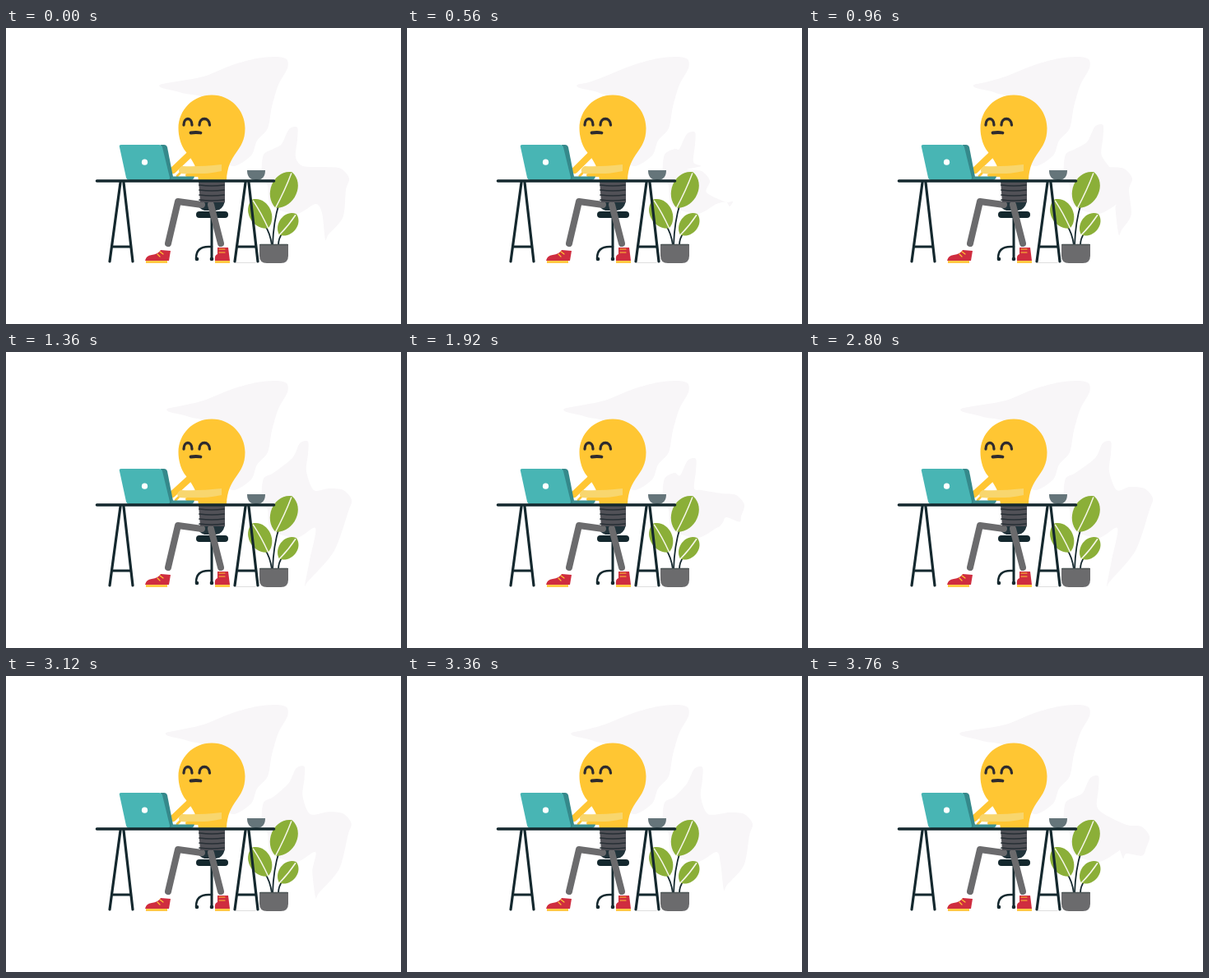
Recreate the animation shown at these times as an HTML page with a canvas. Size 480 by 360 pixels, loop 3.84 s.

```html
<!DOCTYPE html>
<html lang="en">
<head>
<meta charset="utf-8">
<title>Bulb at work</title>
<style>
html, body { margin: 0; width: 100%; height: 100%; overflow: hidden; background: #fff; }
canvas { display: block; width: 480px; height: 360px; }
</style>
</head>
<body>
<canvas id="stage" width="480" height="360"></canvas>
<script>
const ctx = document.getElementById('stage').getContext('2d');
const LOOP = 3840, STEP = 80;
const INK = '#14282e', YELLOW = '#ffc633', GREY = '#6b6b6d', TEAL = '#48b5b4';
const GREEN = '#8baf38', RED = '#cf2d3f', HAZE = '#f8f6f8';

// time, tip x, peak x/y, right edge x/y, tail x/y
const drift = [
  [0, 187, 350, 121, 417, 183, 388, 257],
  [560, 207, 346, 127, 368, 186, 392, 217],
  [1360, 196, 363, 109, 420, 180, 363, 285],
  [1920, 191, 347, 130, 410, 186, 384, 207],
  [2800, 186, 364, 109, 419, 178, 363, 285],
  [3360, 200, 355, 111, 420, 180, 385, 260],
  [3760, 185, 349, 122, 415, 195, 383, 222],
  [LOOP, 187, 350, 121, 417, 183, 388, 257]
];

function driftAt(t) {
  const i = drift.findIndex(k => k[0] > t);
  const a = drift[i - 1], b = drift[i];
  const u = (t - a[0]) / (b[0] - a[0]), e = u * u * (3 - 2 * u);
  return a.map((v, j) => v + (b[j] - v) * e);
}

function fill(path, color) {
  ctx.fillStyle = color;
  ctx.fill(new Path2D(path));
}

function stroke(path, width, color = INK, cap = 'round') {
  ctx.strokeStyle = color;
  ctx.lineWidth = width;
  ctx.lineCap = cap;
  ctx.lineJoin = 'round';
  ctx.stroke(new Path2D(path));
}

function disc(x, y, r, color) {
  ctx.fillStyle = color;
  ctx.beginPath();
  ctx.arc(x, y, r, 0, Math.PI * 2);
  ctx.fill();
}

// Closed smooth curve through every point.
function blob(points, color) {
  const n = points.length, at = i => points[(i + n) % n];
  ctx.beginPath();
  ctx.moveTo(...points[0]);
  for (let i = 0; i < n; i++) {
    const [p, a, b, q] = [at(i - 1), at(i), at(i + 1), at(i + 2)];
    ctx.bezierCurveTo(
      a[0] + (b[0] - p[0]) / 7, a[1] + (b[1] - p[1]) / 7,
      b[0] - (q[0] - a[0]) / 7, b[1] - (q[1] - a[1]) / 7, b[0], b[1]);
  }
  ctx.fillStyle = color;
  ctx.fill();
}

function drawHaze(t) {
  const [, tip, px, py, rx, ry, tx, ty] = driftAt(t);
  blob([
    [tip, 69], [tip + 14, 66], [240, 59], [275, 45], [305, 37], [328, 35],
    [341, 38], [342, 49], [331, 69], [323, 96], [318, 122], [305, 137],
    [297, 156], [270, 165], [250, 92], [tip + 27, 79], [tip + 3, 73]
  ], HAZE);
  blob([
    [311, 176], [313, 154], [325, 147], [px - 15, py + 20], [px - 6, py + 2],
    [px + 4, py], [px + 4, py + 15], [px + 2, py + 36], [px + 11, 168],
    [rx - 28, ry - 14], [rx - 10, ry - 12], [rx, ry], [rx - 4, ry + 14],
    [(rx + tx) / 2 + 7, (ry + ty) / 2 + 10], [tx + 4, ty - 6], [tx, ty],
    [Math.max(tx - 4, 369), Math.max(212, ty - 32)], [376, 214], [353, 226],
    [322, 216], [318, 192]
  ], HAZE);
}

function drawLeaf(x, y, length, width, angle) {
  ctx.save();
  ctx.translate(x, y);
  ctx.rotate(angle);
  const h = length / 2, w = width * 0.66;
  fill(`M0 ${-h}C${w} ${-h * .75} ${w} ${h * .65} 0 ${h}C${-w} ${h * .65} ${-w} ${-h * .75} 0 ${-h}`, GREEN);
  stroke(`M0 ${-h + 2}Q1.5 0 0 ${h}`, 1.5, '#f5f6e8');
  ctx.restore();
}

function drawPlant() {
  stroke('M324 264Q325 235 332 213', 1.8);
  stroke('M323 264Q321 249 314 239', 1.8);
  stroke('M331 264Q331 256 336 249', 1.8);
  drawLeaf(309, 226, 40, 27, -0.5);
  drawLeaf(342.5, 239, 33, 22, 0.68);
  drawLeaf(337.5, 197, 48, 32, 0.43);
  fill('M308 263H343V277Q343 286 334 286H317Q308 286 308 277Z', GREY);
  stroke('M309 263.5H342', 1.5, '#4c5555');
}

function drawTrestle(x) {
  stroke(`M${x - 2} 188L${x - 15} 284M${x + 2} 188L${x + 13} 284`, 3.2);
  stroke(`M${x - 11} 266H${x + 10}`, 2.8);
}

function drawChair() {
  stroke('M250 229V281', 3);
  stroke('M231 280Q231 266 246 266H250', 2.5);
  disc(232, 281, 2.3, INK);
  disc(250, 281, 2.3, INK);
  stroke('M235 227H266', 8);
}

function drawLegs() {
  fill('M234 211H266Q263 222 255 222H241Q235 220 232 214Z', '#22343b');
  stroke('M238 215L209 211L197 262', 8, GREY);
  stroke('M249 215L261 262', 8, GREY);

  fill('M169 283Q170 277 177 276Q185 275 188 270L200 271L198 283Z', RED);
  stroke('M170 284.5H196', 2.7, YELLOW, 'butt');
  stroke('M184 275L187 278M187 272L191 275', 1.2, YELLOW);
  fill('M257 267H270L272 283H254Q253 276 257 275Z', RED);
  stroke('M254 284.5H272', 2.7, YELLOW, 'butt');
  stroke('M259 269H266M259 273H266', 1.2, YELLOW);
}

function drawBulb(t) {
  const tap = Math.sin(t / 480 * Math.PI * 2);
  stroke(`M224 153L${203 + tap} 173`, 8, YELLOW);
  fill('M250 81.5C273 81.5 290.5 100 290.5 122C290.5 151 269 151 268 186H234C232 164 222 156 216 147C212 140 209.5 131 209.5 122C209.5 100 227 81.5 250 81.5Z', YELLOW);

  stroke('M216 118C216 108 226 108 226 118', 3.3, '#2e2b2e');
  stroke('M235 118C235 108 247 108 247.5 118', 3.3, '#2e2b2e');
  stroke('M224.5 127.5Q231 126.5 236.5 127.5', 3.8, '#2e2b2e');

  const hand = 211 + 2 * tap;
  fill(`M${hand + 3} 168Q235 169 262 166V174Q240 179 ${hand} 177Q${hand - 3} 171 ${hand + 3} 168`, '#f8d66e');
  stroke(`M${hand} 177L${hand - 3} 180`, 2.8, YELLOW);
  stroke('M220 179H240', 4, YELLOW);

  fill('M234 186H266V212H236Z', '#515157');
  for (let y = 191; y < 213; y += 6) stroke(`M235 ${y}Q250 ${y + 2} 265 ${y}`, 1.7, '#272f35');
}

function drawLaptop() {
  fill('M188 142H192Q195 142 196 145L203 181Q203 185 199 185H192Z', '#35898b');
  fill('M140 142H186Q189 142 190 145L199 182Q199 185 196 185H150Q147 185 146 182L138 145Q137 142 140 142Z', TEAL);
  fill('M201 180.5H229Q228 185 224 185H201Z', '#3f9293');
  disc(168.5, 163.2, 3.6, '#fff');
}

function draw(now) {
  const t = Math.floor((now % LOOP) / STEP) * STEP;
  ctx.fillStyle = '#fff';
  ctx.fillRect(0, 0, 480, 360);
  drawHaze(t);
  drawPlant();
  drawChair();
  drawLegs();
  drawBulb(t);
  drawLaptop();
  stroke('M279 285.5H303', 1, '#dedede');
  fill('M293 173H315Q315 185 304 185Q293 185 293 173Z', '#65757a');
  drawTrestle(141);
  drawTrestle(293);
  stroke('M110.5 186H325.5', 3.6);
  requestAnimationFrame(draw);
}

requestAnimationFrame(draw);
</script>
</body>
</html>
```
